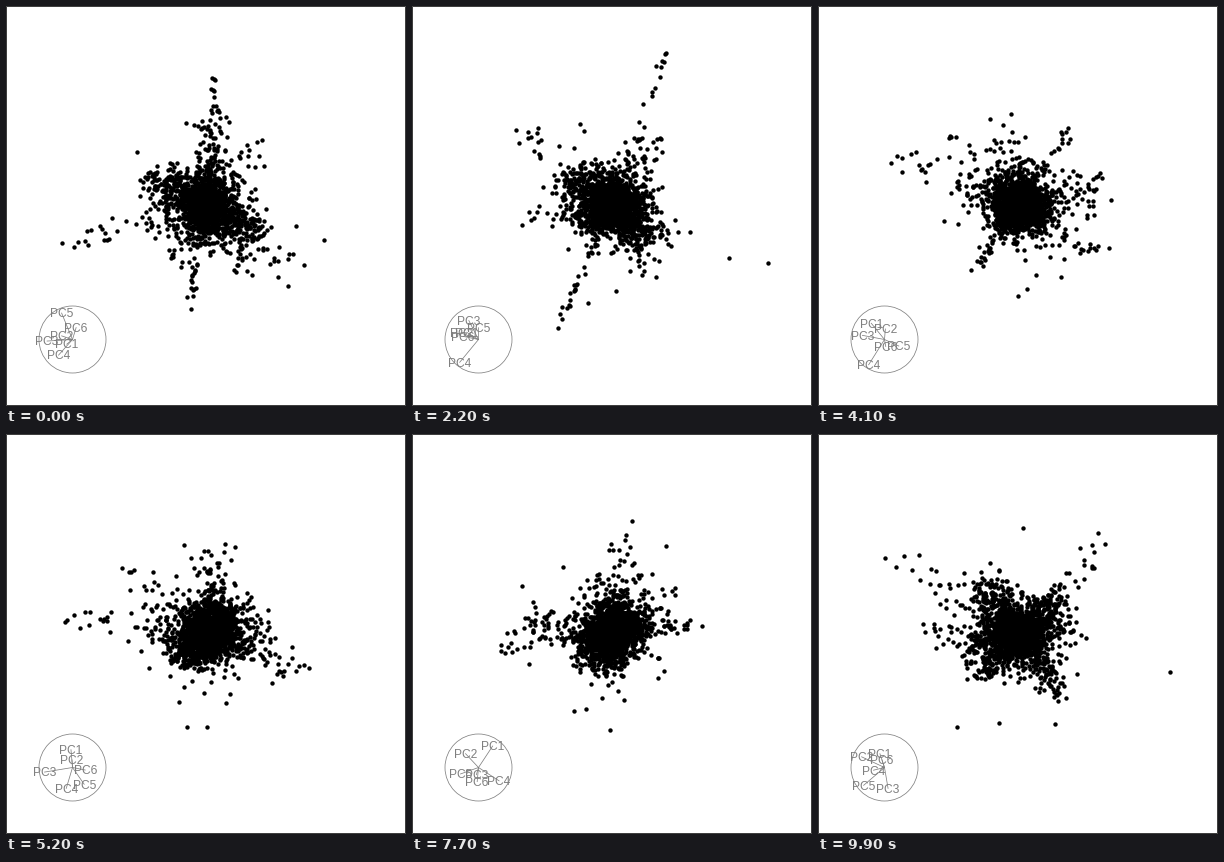
Write a matplotlib script that moves like this. It is 400 by 400 pixels and loops after 10000 ms.

```python
import numpy as np
import matplotlib.pyplot as plt
from matplotlib.animation import FuncAnimation
from matplotlib.patches import Circle, Rectangle

SIZE, DPI, FRAMES, STEP = 400, 100, 100, 100
PX = 72 / DPI                      # one pixel in points
LINE, GREY = 0.75 * PX, "#7f7f7f"
HUB, RADIUS = 66.5 + 333.5j, 33.5

# Stops of the tour: stage positions of PC1, PC2, PC3, PC5 and PC6.
# PC4 follows from these, because the two plane axes are orthonormal.
TIMES = np.array([0, 13, 30, 52, 65, 88, 99])
STOPS = np.array([
    [61 + 338j, 56 + 330j, 42 + 335j, 56 + 308j, 70 + 322j],
    [67 + 334j, 43 + 334j, 60 + 319j, 56 + 319j, 57 + 319j],
    [47 + 321j, 62 + 322j, 53 + 318j, 77 + 326j, 54 + 342j],
    [65 + 316j, 66 + 326j, 39 + 338j, 78 + 350j, 79 + 336j],
    [79 + 310j, 59 + 317j, 43 + 336j, 67 + 339j, 66 + 345j],
    [72 + 315j, 51 + 323j, 79 + 348j, 41 + 346j, 67 + 343j],
    [62 + 320j, 44 + 323j, 70 + 354j, 46 + 351j, 64 + 326j],
])

# Directions in the cloud, each given as it looks at one or two stops: (stop, x, y)
RIDGES = [[(0, 60, -22)], [(1, 62, -26)], [(6, -40, 50)]]
THIN_ARMS = [[(1, 54, 176)], [(1, -55, -138)]]
LOOSE_ARMS = [
    [(3, -140, 13), (1, -80, 30)], [(0, 10, 95), (2, 70, 50)],
    [(6, -118, 76)], [(4, 22, 100)], [(3, -85, 65)], [(1, 45, -75)],
    [(3, 90, -35)], [(5, -110, 10)], [(6, 80, 85)],
]
STRAYS = [[(2, 110, -80), (6, 158, -43)]]


def orthonormal(m):
    left, _, right = np.linalg.svd(m, full_matrices=False)
    return left @ right


def make_planes():
    z = np.conj(STOPS - HUB) / RADIUS
    pc4 = np.sqrt(-(z ** 2).sum(axis=1))
    pc4 *= -np.sign(pc4.imag)      # PC4 always points down
    z = np.insert(z, 3, pc4, axis=1)
    return orthonormal(np.stack([z.real, z.imag], axis=1))


def direction(views):
    """Shortest 6D vector that projects to the given views."""
    planes = np.vstack([PLANES[stop] for stop, _, _ in views])
    return np.linalg.pinv(planes) @ np.ravel([xy for _, *xy in views])


def make_cloud():
    rng = np.random.default_rng(6)
    parts = [rng.normal(0, 12, (1250, 6)) * rng.lognormal(0, 0.4, (1250, 1))]

    def add(views, reach, spread):
        noise = rng.normal(0, spread, (len(reach), 6))
        parts.append(reach[:, None] * direction(views) + noise)

    for views in RIDGES:
        add(views, rng.uniform(-1, 1, 210), 8)
    for arms, n, spread in (THIN_ARMS, 28, 2.5), (LOOSE_ARMS, 38, 8), (STRAYS, 2, 4):
        for views in arms:
            reach = 0.22 + 0.78 * rng.random(n) ** 1.5
            reach[0] = 1
            add(views, reach, spread)
    return np.vstack(parts)


def basis(t):
    """Smooth path through the stops, made orthonormal again."""
    k = min(np.searchsorted(TIMES, t, side="right") - 1, len(TIMES) - 2)
    span = TIMES[k + 1] - TIMES[k]
    u = (t - TIMES[k]) / span
    h = u * u * (3 - 2 * u)
    bend = span * u * (1 - u) * ((1 - u) * SLOPES[k] - u * SLOPES[k + 1])
    return orthonormal(PLANES[k] * (1 - h) + PLANES[k + 1] * h + bend)


PLANES = make_planes()
SLOPES = np.gradient(PLANES, TIMES, axis=0)
CLOUD = make_cloud()

fig = plt.figure(figsize=(SIZE / DPI, SIZE / DPI), dpi=DPI, facecolor="white")
ax = fig.add_axes([0, 0, 1, 1])
ax.set(xlim=(0, SIZE), ylim=(SIZE, 0))
ax.axis("off")
ax.add_patch(Rectangle((0.5, 0.5), SIZE - 1, SIZE - 1, fill=False, ec="black",
                       lw=LINE, snap=False))
ax.add_patch(Circle((HUB.real, HUB.imag), RADIUS, fill=False, ec=GREY, lw=LINE))
dots, = ax.plot([], [], "o", color="black", ms=4.4 * PX, mew=0)
spokes = [ax.plot([], [], color=GREY, lw=LINE, snap=False)[0] for _ in range(6)]
labels = [ax.text(0, 0, f"PC{i + 1}", color=GREY, family="Liberation Sans",
                  size=12 * PX, ha="center", va="baseline") for i in range(6)]


def draw(i):
    plane = basis(i)
    x, y = plane @ CLOUD.T
    dots.set_data(SIZE / 2 + x, SIZE / 2 - y)
    for spoke, label, (wx, wy) in zip(spokes, labels, plane.T):
        tip = HUB + RADIUS * complex(wx, -wy)
        spoke.set_data([HUB.real, tip.real], [HUB.imag, tip.imag])
        label.set_position((tip.real, tip.imag + 4.3))
    return [dots, *spokes, *labels]


anim = FuncAnimation(fig, draw, frames=FRAMES, interval=STEP, repeat=True, repeat_delay=0)
plt.show()
```
